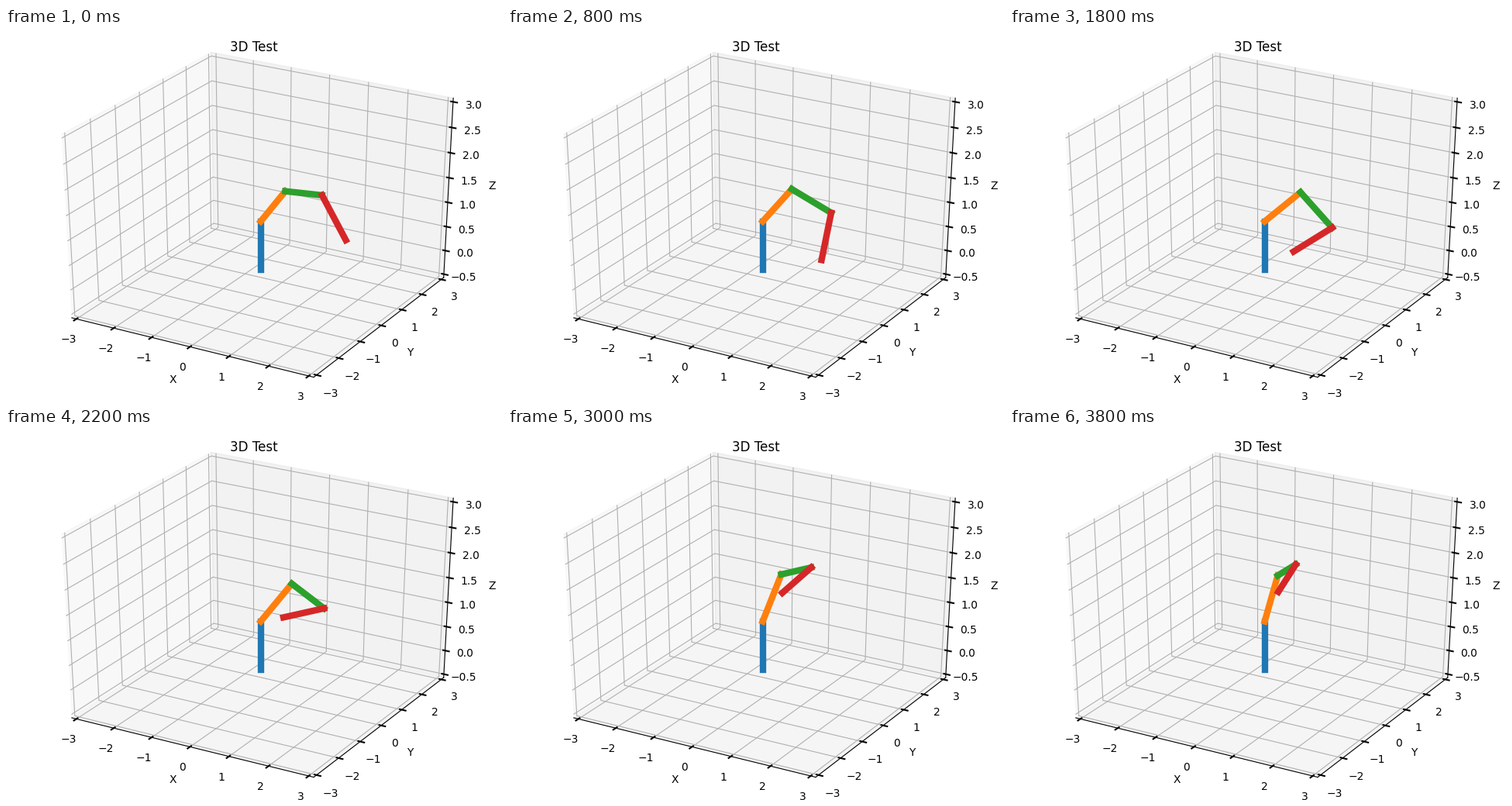
Write a matplotlib script that moves like this. It is 640 by 480 pixels and loops after 4 s.

```python
import numpy as np
import matplotlib.pyplot as plt
from matplotlib.animation import FuncAnimation
from matplotlib.collections import LineCollection
from matplotlib.patches import Polygon

FRAMES, INTERVAL = 20, 200
LOW = np.array([-3, -3, -0.5])
SPAN = np.array([6, 6, 3.5])
EDGE = 0.5 + 1 / 48          # panes reach a little past the limits
DELTA = 1 / 12
PER_POINT = 48 / (72 * (6.4 + 4.8))
DIST = 10

# Camera basis for elevation 30, azimuth -60
elev, azim = np.radians([30, -60])
N = np.array([np.cos(azim) * np.cos(elev), np.sin(azim) * np.cos(elev), np.sin(elev)])
U = np.array([-np.sin(azim), np.cos(azim), 0])
V = np.cross(N, U)


def project(p):
    """Perspective view of points in the centred unit cube."""
    p = np.asarray(p, float)
    depth = DIST - p @ N
    return np.stack([p @ U / depth, p @ V / depth], axis=-1)


def to_cube(p):
    return (np.asarray(p, float) - LOW) / SPAN - 0.5


fig = plt.figure(figsize=(6.4, 4.8), dpi=100, facecolor="white")
ax = fig.add_axes([0, 0, 1, 1])
ax.set_xlim(-0.095, 0.09)
ax.set_ylim(-0.095, 0.09)
ax.axis("off")
fig.text(0.5, 0.92 + 6 / 72 / 4.8, "3D Test", size=12, ha="center", va="baseline")

BACK = np.array([-EDGE, EDGE, -EDGE])   # corner where the three panes meet


def draw_pane(i, grey):
    j, k = (i + 1) % 3, (i + 2) % 3
    corners = np.tile(BACK, (4, 1))
    corners[:, j] = np.array([-1, 1, 1, -1]) * EDGE
    corners[:, k] = np.array([-1, -1, 1, 1]) * EDGE
    ax.add_patch(Polygon(project(corners), closed=False, fc=(grey,) * 3,
                         ec=(grey,) * 3, alpha=0.5, lw=1, zorder=1))


def push_out(p, i, points):
    """Move p away from the cube's centre, except along axis i."""
    step = np.sign(p) * points * PER_POINT * DELTA
    step[i] = 0
    return p + step


def draw_axis(i, name, values, corner, tick_dir, fmt):
    corner = np.array(corner) * EDGE
    ends = np.tile(corner, (2, 1))
    ends[:, i] = -EDGE, EDGE
    ax.plot(*project(ends).T, color="black", lw=0.8, zorder=1)

    middle = corner.copy()
    middle[i] = 0
    ax.text(*project(push_out(middle, i, 25)), name, size=10,
            ha="center", va="center", zorder=1)

    spots = (values - LOW[i]) / SPAN[i] - 0.5
    grid = []
    for s in spots:
        path = np.tile(BACK, (3, 1))
        path[:, i] = s
        path[0, (i + 1) % 3] *= -1
        path[2, (i + 2) % 3] *= -1
        grid.append(project(path))
    ax.add_collection(LineCollection(grid, colors="#b0b0b0", linewidths=0.8, zorder=1),
                      autolim=False)

    for value, s in zip(values, spots):
        base = corner.copy()
        base[i] = s
        tick = np.tile(base, (2, 1))
        tick[:, tick_dir] += np.sign(base[tick_dir]) * DELTA * np.array([-0.1, 0.2])
        ax.plot(*project(tick).T, color="black", lw=1.5, zorder=1)
        label = format(value, fmt).replace("-", "\u2212")
        ax.text(*project(push_out(base, i, 11.5)), label, size=10,
                ha="center", va="top", zorder=1)


for i, grey in enumerate((0.95, 0.90, 0.925)):
    draw_pane(i, grey)
whole = np.arange(-3, 4)
draw_axis(0, "X", whole, (0, -1, -1), 1, "d")
draw_axis(1, "Y", whole, (1, 0, -1), 0, "d")
draw_axis(2, "Z", np.arange(-0.5, 3.1, 0.5), (1, 1, 0), 0, ".1f")

# Arm poses in degrees: base heading, then the pitch of each moving link
TIMES = [0, 0.4, 1.2, 1.8, 2.6, 3.4, 3.8]
HEADING = [-6.5, 2, 17, 26, 79.5, 74, 95.5]
PITCH = [
    [47.5, 50.3, 42.8, 37, 45.3, 60, 45],
    [6.7, -7.8, -34.5, -44, -29.5, 18.6, -4],
    [-48.8, -70.4, -133.4, -149.5, -204.5, -122.6, -164.5],
]

links = [ax.plot([], [], color=f"C{k}", lw=6, zorder=2)[0] for k in range(4)]


def joints(t):
    head = np.radians(np.interp(t, TIMES, HEADING))
    points = [np.zeros(3), np.array([0.0, 0.0, 1.0])]
    for track in PITCH:
        pitch = np.radians(np.interp(t, TIMES, track))
        reach = np.cos(pitch)
        step = np.array([reach * np.cos(head), reach * np.sin(head), np.sin(pitch)])
        points.append(points[-1] + step)
    return project(to_cube(points))


def update(frame):
    points = joints(frame * INTERVAL / 1000)
    for k, link in enumerate(links):
        link.set_data(*points[k:k + 2].T)
    return links


anim = FuncAnimation(fig, update, frames=FRAMES, interval=INTERVAL,
                     repeat=True, repeat_delay=0, blit=False)
plt.show()
```
